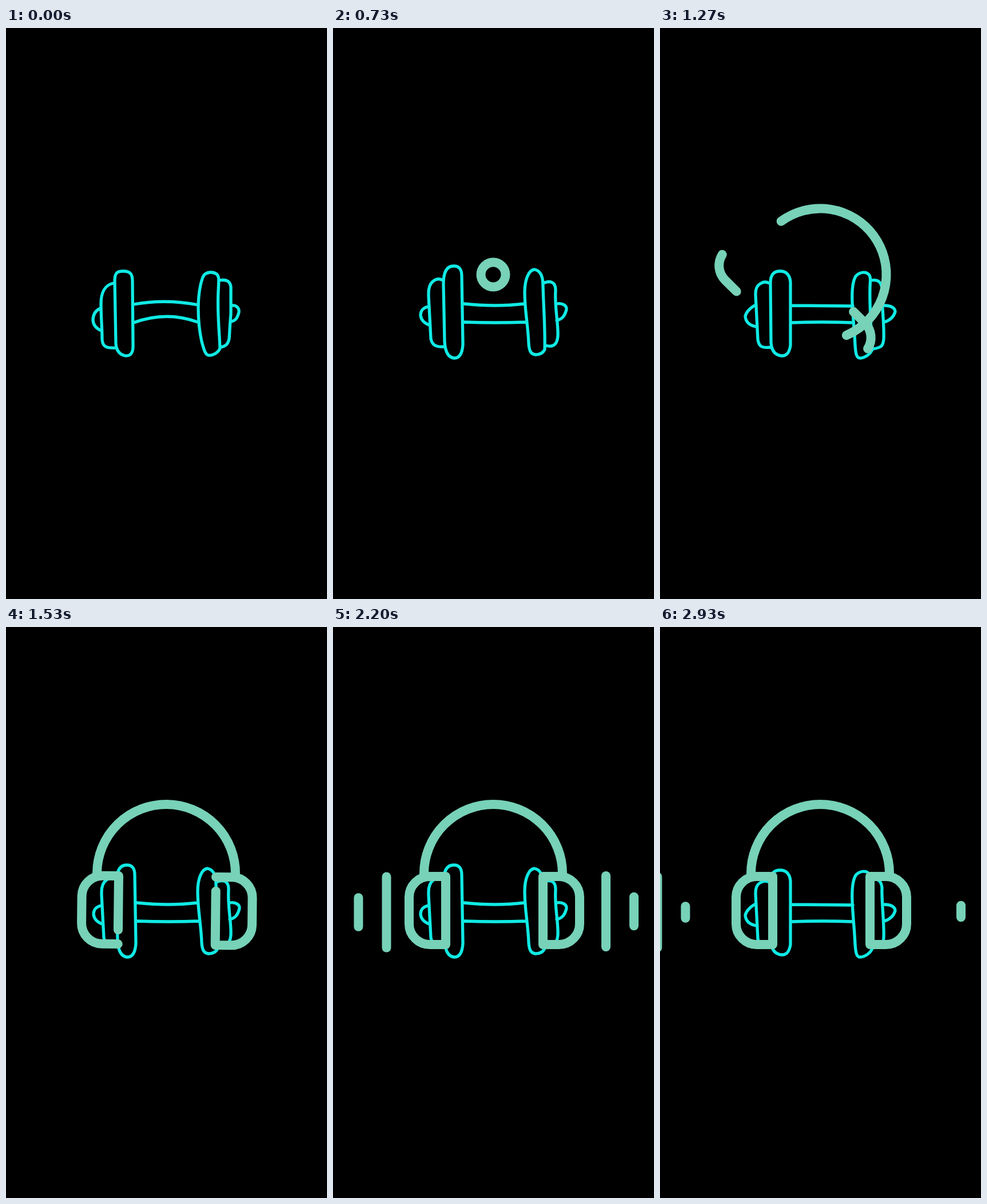
Recreate the animation shown at these times as an HTML page with a canvas. Size 561 by 998 pixels, loop 2.99 s.

```html
<!DOCTYPE html>
<html>
<head>
<meta charset="utf-8">
<style>
  html, body { margin: 0; width: 100%; height: 100%; overflow: hidden; background: #000; }
  canvas { display: block; width: 561px; height: 998px; }
</style>
</head>
<body>
<canvas id="stage" width="561" height="998"></canvas>
<script>
const ctx = document.getElementById('stage').getContext('2d');
const LOOP = 2990, STEP = LOOP / 45;
const CYAN = '#10eae4', GREEN = '#77d2b7';
const CX = 280, CY = 431, LINE = 16;

// Three hand-drawn dumbbell poses
const poses = [
  [
    'M190 442 C190 428 194 425 205 425 C217 425 221 430 221 442 L222 556 C222 568 218 573 209 573 C198 571 193 564 192 552 Z',
    'M188 446 C172 449 166 464 166 482 C166 505 168 525 168 545 C169 556 174 560 191 559',
    'M165 490 C156 494 152 502 152 511 C153 521 159 526 167 529',
    'M223 483 Q278 473 336 484 M223 515 Q280 494 335 514',
    'M336 490 C336 460 342 434 348 430 C354 426 362 426 368 430 C373 434 372 440 371 460 C369 500 373 530 374 560 C371 567 362 573 354 572 C348 571 346 562 342 548 C338 530 336 510 336 490 Z',
    'M374 441 C386 439 392 443 393 453 L393 500 C391 520 391 533 390 543 C388 553 384 556 375 558',
    'M395 485 C403 484 408 490 407 497 C404 508 401 511 394 513'
  ],
  [
    'M193 446 C193 432 198 425 210 425 C221 425 227 432 228 444 L228 555 C226 567 222 573 213 573 C201 572 195 564 194 550 Z',
    'M191 446 Q183 442 177 446 C169 450 167 456 167 466 L171 545 C173 556 177 560 194 558',
    'M167 484 C156 490 150 498 149 504 C150 514 157 520 168 522',
    'M230 485 L337 486 M230 515 Q283 513 337 515',
    'M336 480 C335 455 337 442 342 434 C348 427 358 425 364 430 C368 433 368 438 367 452 C366 490 369 525 371 562 C367 571 357 577 349 577 C343 576 342 568 341 555 C340 530 337 505 336 480 Z',
    'M369 441 C381 439 387 444 388 456 C387 480 392 515 391 543 C390 556 387 559 371 561',
    'M392 485 C405 485 411 490 411 496 C408 506 402 511 392 514'
  ],
  [
    'M193 447 C193 427 199 416 211 416 C221 416 225 422 225 434 L227 553 C226 569 221 577 212 577 C201 576 196 566 195 548 Z',
    'M192 441 C184 436 176 440 171 447 C167 453 167 460 167 468 L171 543 C173 553 178 558 194 557',
    'M166 487 C157 489 153 495 153 502 C154 511 160 516 168 519',
    'M229 482 Q285 488 334 482 M229 514 Q285 516 338 514',
    'M335 462 C335 440 342 423 352 422 C363 424 367 434 367 450 C368 490 371 525 370 562 C367 568 361 571 354 571 C346 570 343 565 342 552 C341 520 335 495 335 462 Z',
    'M370 445 C381 441 389 445 389 458 C387 490 394 515 393 538 C392 551 387 559 372 555',
    'M391 482 C402 480 409 486 408 492 C405 504 400 509 391 511'
  ]
].map(parts => new Path2D(parts.join(' ')));

const CUP_LEN = 336;
const cup = new Path2D('M197 555 L169 555 A36 36 0 0 1 133 519 L133 472 A36 36 0 0 1 169 436 L197 436 Z');

const part = (t, from, len) => Math.min(1, Math.max(0, (t - from) / len));
const quad = p => p < .5 ? 2 * p * p : 1 - 2 * (1 - p) ** 2;
const cubic = p => p < .5 ? 4 * p ** 3 : 1 - 4 * (1 - p) ** 3;
const rad = deg => deg * Math.PI / 180;

function drawDumbbell(t) {
  const phase = t / STEP / 12.5 + .08;
  ctx.strokeStyle = CYAN;
  ctx.lineWidth = 5.3;
  ctx.stroke(poses[Math.floor(phase * 3) % 3]);
}

function drawDot(t) {
  const grow = 1 - (1 - part(t, 130, 260)) ** 3;
  const outer = 35 * grow - 5.5 * quad(part(t, 400, 310));
  const hole = 13.5 * quad(part(t, 490, 230));
  ctx.beginPath();
  ctx.arc(CX, CY, outer, 0, 7);
  ctx.arc(CX, CY, hole, 0, 7);
  ctx.fill('evenodd');
}

function drawCup(shown) {
  ctx.setLineDash(shown < 1 ? [CUP_LEN * shown, 1000] : []);
  ctx.stroke(cup);
  ctx.setLineDash([]);
}

function drawHeadphones(t) {
  const e = cubic(part(t, 730, 700));
  const turn = 180 * (1 - cubic(part(t, 730, 882)));
  const span = Math.min(360, 180 + 235 * (1 - e));
  const start = 180 + 163 * (1 - e);

  ctx.save();
  ctx.translate(CX, CY);
  ctx.rotate(rad(turn));
  ctx.translate(-CX, -CY);
  ctx.lineWidth = LINE;
  ctx.beginPath();
  ctx.arc(CX, CY, 21.5 + 99.5 * e, rad(start), rad(start + span));
  ctx.stroke();

  const shown = quad(part(t, 1070, 570));
  if (shown > 0) {
    drawCup(shown);
    ctx.translate(564, 991);
    ctx.rotate(Math.PI);
    drawCup(shown);
  }
  ctx.restore();
}

function drawBar(x, y, size) {
  const w = Math.min(LINE, size), half = (size - w) / 2;
  ctx.lineWidth = w;
  ctx.beginPath();
  ctx.moveTo(x, y - half);
  ctx.lineTo(x, y + half + .01);
  ctx.stroke();
}

function drawWaves(t) {
  for (let i = 0; i < 3; i++) {
    const age = t - 1600 - 400 * i;
    const size = 140 * (quad(part(age, 0, 395)) - quad(part(age, 700, 350)));
    if (size < 1) continue;
    drawBar(93.5 - 49 * i, 498.5, size);
    drawBar(477 + 49 * i, 497, size);
  }
}

function draw(now) {
  const t = Math.floor((now % LOOP + 5) / STEP) % 45 * STEP;
  ctx.fillStyle = '#000';
  ctx.fillRect(0, 0, 561, 998);
  ctx.lineCap = ctx.lineJoin = 'round';
  drawDumbbell(t);
  ctx.fillStyle = ctx.strokeStyle = GREEN;
  if (t < 735) drawDot(t);
  else drawHeadphones(t);
  drawWaves(t);
}

let begin;
function tick(now) {
  begin ??= now;
  draw(now - begin);
  requestAnimationFrame(tick);
}
requestAnimationFrame(tick);
</script>
</body>
</html>
```
